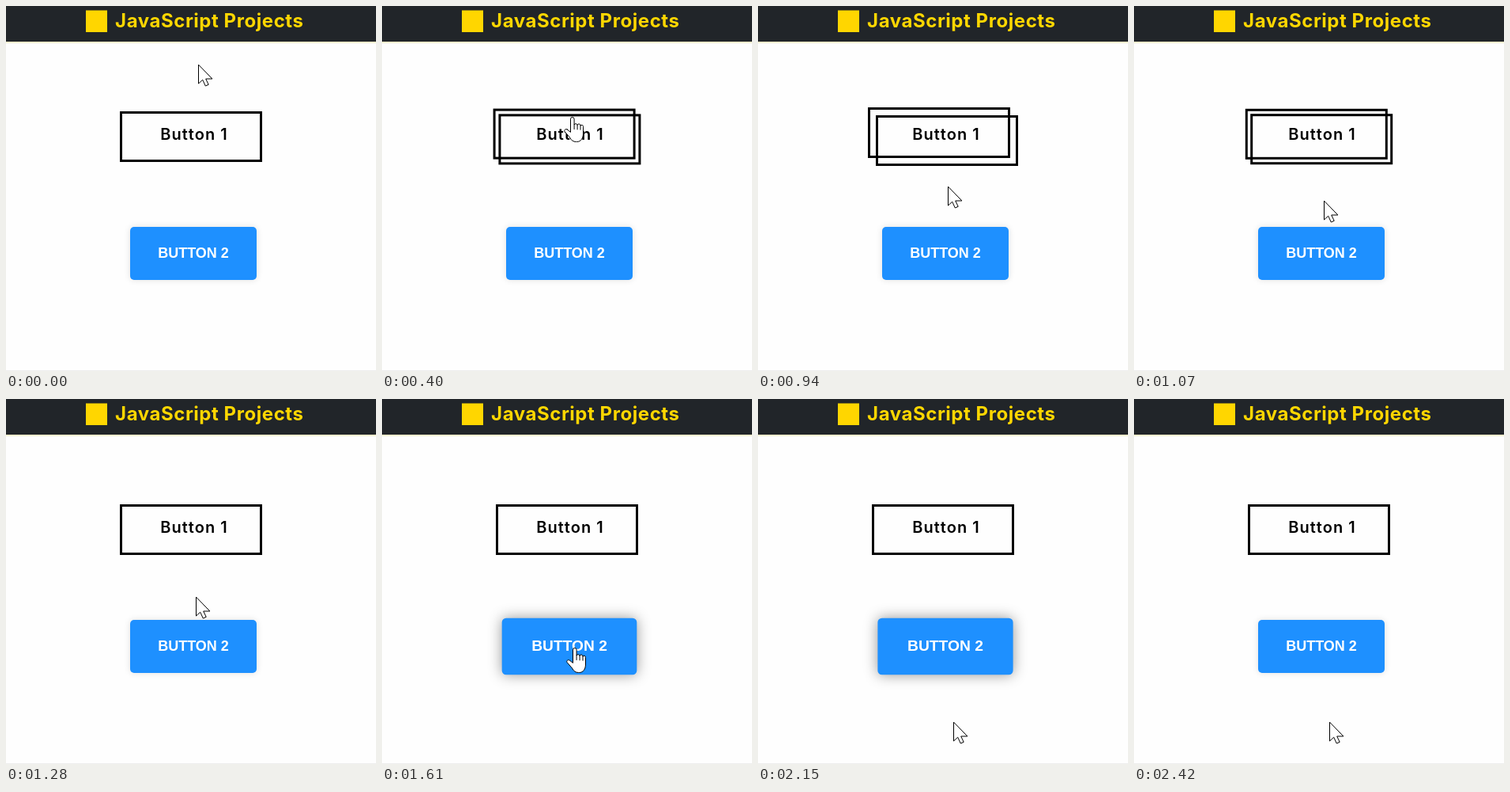
These frames come from a looping animation (468x461 px, 2.55 s). An HTML page:

```html
<!DOCTYPE html>
<html lang="en">
<head>
<meta charset="utf-8">
<title>Button hover effects</title>
<style>
  @property --gap { syntax: "<length>"; inherits: true; initial-value: 0px; }
  @property --lift { syntax: "<number>"; inherits: true; initial-value: 0; }

  html, body { margin: 0; width: 100%; height: 100%; overflow: hidden; background: #fefefe; }
  svg { position: absolute; left: 0; top: 0; width: 468px; height: 461px; }

  .title { font: 700 24px Inter, "Open Sans", sans-serif; letter-spacing: .55px; fill: #ffd700; }
  .label { font: 600 20px Inter, "Open Sans", sans-serif; letter-spacing: 1.05px; fill: #000; }
  text { text-anchor: middle; }

  .frame, .pointer, .arrow, .hand, .solid { animation: 2550ms step-end infinite; }

  .frame { animation-name: spread; fill: none; stroke: #000; stroke-width: 3; }
  .back { transform: translate(calc(var(--gap) * -1), calc(var(--gap) * -1)); }
  .front { transform: translate(var(--gap), var(--gap)); }

  .solid {
    animation-name: lift;
    position: absolute; left: 157px; top: 279px; width: 160px; height: 67px;
    border-radius: 5px; background: #1e90ff; color: #fff;
    font: 700 18px/67px "Liberation Sans", Arial, sans-serif; text-align: center;
    transform: scale(calc(1 + .07 * var(--lift)));
    box-shadow: 0 0 calc(8px + 8px * var(--lift)) rgb(0 0 0 / calc(.12 + .3 * var(--lift)));
  }

  .pointer { animation-name: travel; }
  .pointer path { fill: #fff; stroke: #000; stroke-linejoin: round; stroke-linecap: round; }
  .arrow { animation-name: arrow; }
  .hand { animation-name: hand; }

  @keyframes spread {
    0% { --gap: 0px }
    13.33% { --gap: 1.5px }
    15.68% { --gap: 3.4px }
    18.43% { --gap: 4.5px }
    21.17% { --gap: 4.9px }
    23.92% { --gap: 5px }
    39.6% { --gap: 3.2px }
    42.35% { --gap: 1.3px }
    44.7% { --gap: .4px }
    47.45% { --gap: .1px }
    50.19%, 100% { --gap: 0px }
  }
  @keyframes lift {
    0% { --lift: 0 }
    60.39% { --lift: .5 }
    63.13% { --lift: .95 }
    65.88% { --lift: .98 }
    68.23% { --lift: .99 }
    70.98% { --lift: 1 }
    86.66% { --lift: .7 }
    89.41% { --lift: .3 }
    92.15% { --lift: .08 }
    94.9%, 100% { --lift: 0 }
  }
  @keyframes travel {
    0% { transform: translate(243px, 74px) }
    5.09% { transform: translate(243px, 78px) }
    7.84% { transform: translate(242px, 98px) }
    10.58% { transform: translate(241px, 122px) }
    13.33% { transform: translate(240px, 136px) }
    15.68% { transform: translate(240px, 140px) }
    34.11% { transform: translate(240px, 176px) }
    36.86% { transform: translate(240px, 228px) }
    39.6% { transform: translate(240px, 246px) }
    42.35% { transform: translate(240px, 250px) }
    55.29% { transform: translate(240px, 253px) }
    58.03% { transform: translate(241px, 270px) }
    60.39% { transform: translate(242px, 298px) }
    63.13% { transform: translate(243px, 314px) }
    78.82% { transform: translate(244px, 338px) }
    81.56% { transform: translate(246px, 386px) }
    84.31%, 100% { transform: translate(247px, 408px) }
  }
  @keyframes arrow {
    0%, 36.86%, 81.56%, 100% { opacity: 1 }
    13.33%, 60.39% { opacity: 0 }
  }
  @keyframes hand {
    0%, 36.86%, 81.56%, 100% { opacity: 0 }
    13.33%, 60.39% { opacity: 1 }
  }
</style>
</head>
<body>
<svg viewBox="0 0 468 461">
  <rect width="468" height="45" fill="#212529"/>
  <rect y="45" width="468" height="2" fill="#fff3cf"/>
  <rect x="101" y="5.5" width="27" height="27.5" fill="#ffd600"/>
  <text class="title" x="257.3" y="27">JavaScript Projects</text>

  <g class="frame">
    <rect class="back" x="145.5" y="134.5" width="177" height="61"/>
    <rect class="front" x="145.5" y="134.5" width="177" height="61"/>
  </g>
  <text class="label" x="238" y="169">Button 1</text>

  <rect y="460" width="468" height="1" fill="#eee"/>
</svg>

<div class="solid">BUTTON 2</div>

<svg viewBox="0 0 468 461">
  <g class="pointer">
    <path class="arrow" d="M.5 .5V24L5.7 19.2 9.3 27 13.2 25.3 9.7 18H17.5Z"/>
    <g class="hand" >
      <path transform="translate(-10)" d="M8.5 19V2.8a2.3 2.3 0 0 1 4.6 0V10a2.1 2.1 0 0 1 4 .4a2 2 0 0 1 3.9 .8a1.9 1.9 0 0 1 3.5 1.2V21c0 6-3 10.5-8 10.5h-1c-4 0-6-2-8-5.5L1 18.5c-1-2 1.5-4 3.5-2.3ZM13.1 10v5.5M17.1 10.4v5.5M21 11.2v5"/>
    </g>
  </g>
</svg>
</body>
</html>
```
